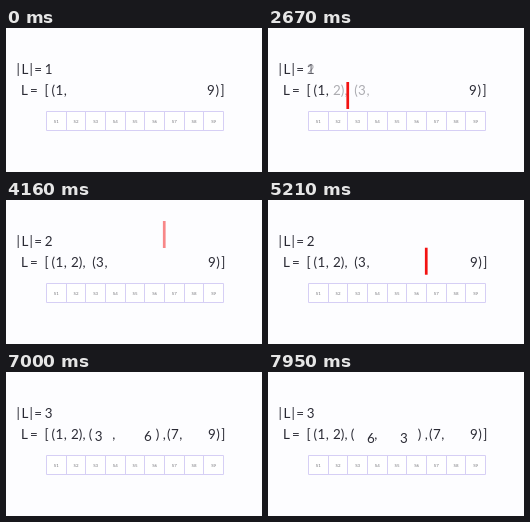
An HTML page for the animation above (7.99 s loop, 256 px wide and 144 px high).

```html
<!DOCTYPE html>
<html lang="en">
<head>
<meta charset="utf-8">
<title>Splitting a list of intervals</title>
<style>
  html, body { margin: 0; width: 100%; height: 100%; overflow: hidden; background: #fdfdff; }
  svg { display: block; width: 100vw; height: 100vh; }
  text { font: 13.4px Lato, "Open Sans", sans-serif; fill: #2a2a34; text-anchor: middle; }
  .label { font-size: 4.4px; fill: #77777c; }
  .cells { fill: #fff; stroke: #d6cff5; stroke-width: 1; }
  .bar { fill: #f31212; }
</style>
</head>
<body>
<svg id="stage" viewBox="0 0 256 144"></svg>
<script>
const LOOP = 7990, ROW1 = 46, ROW2 = 67;
const stage = document.getElementById("stage");

function add(tag, attrs, parent = stage, content = "") {
  const el = document.createElementNS("http://www.w3.org/2000/svg", tag);
  for (const key in attrs) el.setAttribute(key, attrs[key]);
  el.textContent = content;
  parent.appendChild(el);
  return el;
}

// Each glyph is given as [character, centre x].
function glyphs(y, list) {
  const g = add("g", {});
  for (const [ch, x] of list) add("text", { x, y }, g, ch);
  return g;
}

// Row of nine cells
const LEFT = 40.5, TOP = 83.5, CELL = 177 / 9, HEIGHT = 19;
let lines = `M${LEFT} ${TOP}h177v${HEIGHT}h-177z`;
for (let i = 1; i < 9; i++) lines += `M${LEFT + Math.round(i * CELL)} ${TOP}v${HEIGHT}`;
add("path", { d: lines, class: "cells" });
for (let i = 0; i < 9; i++) {
  add("text", { x: LEFT + (i + 0.5) * CELL, y: 94.8, class: "label" }, stage, "S" + (i + 1));
}

// Text
glyphs(ROW1, [["|", 12.3], ["L", 19], ["|", 25.3], ["=", 32.2]]);
const counts = [1, 2, 3].map(n => glyphs(ROW1, [[n, 42.6]]));
glyphs(ROW2, [["L", 18.5], ["=", 28], ["[", 40.5], ["(", 47.2], ["1", 53.3], [",", 59.3]]);
const tail = glyphs(ROW2, [["9", 205], [")", 211.2], ["]", 216.5]]);
const firstSplit = glyphs(ROW2, [["2", 69], [")", 74.5], [",", 78]]);
const openThree = glyphs(ROW2, [["(", 88], ["3", 94], [",", 100]]);
const closeSix = glyphs(ROW2, [["6", 146.2], [")", 152.3], [",", 156.2]]);
const openSeven = glyphs(ROW2, [["(", 162.8], ["7", 168.8], [",", 174.8]]);
const spread = glyphs(ROW2, [["(", 84.5], [",", 107.8], [")", 151.5], [",", 158.2]]);
const three = glyphs(ROW2, [["3", 0]]);
const six = glyphs(ROW2, [["6", 0]]);

// Red dividers: fade in, drop, fade out
const bars = [
  { x: 78.4, from: 17.3, to: 54, fadeIn: 970, drop: 1510, fadeOut: 3000 },
  { x: 156.9, from: 21, to: 57, fadeIn: 3910, drop: 4570, fadeOut: 6060 }
];
for (const b of bars) b.el = add("rect", { x: b.x, y: 0, width: 2.7, height: 27, class: "bar" });

const ramp = (t, start, length) => Math.min(1, Math.max(0, (t - start) / length));
const ease = p => p < 0.5 ? 2 * p * p : 1 - 2 * (1 - p) ** 2;
const mix = (a, b, p) => a + (b - a) * p;
const show = (el, opacity) => el.setAttribute("opacity", opacity);
const move = (el, x, y) => el.setAttribute("transform", `translate(${x} ${y})`);

function draw(t) {
  for (const b of bars) {
    b.el.setAttribute("y", mix(b.from, b.to, ease(ramp(t, b.drop, 1000))));
    show(b.el, ramp(t, b.fadeIn, 500) * (1 - ramp(t, b.fadeOut, 500)));
  }

  const split1 = ramp(t, 2480, 500), split2 = ramp(t, 5560, 500);
  const loose = t >= 6570 ? 1 : 0;
  show(counts[0], 1 - split1);
  show(counts[1], split1 * (1 - split2));
  show(counts[2], split2);
  show(firstSplit, split1);
  show(openThree, split1 * (1 - loose));
  show(closeSix, split2 * (1 - loose));
  show(openSeven, split2);
  move(tail, t < 3930 ? 0 : 0.8, 0);

  // The two digits trade places along a shallow arc.
  const p = ease(ramp(t, 6743, 1578)), dip = 11 * Math.sin(Math.PI * p);
  for (const el of [spread, three, six]) show(el, loose);
  move(three, mix(90, 141.5, p), dip);
  move(six, mix(144.3, 97.8, p), dip);
}

const begin = performance.now();
function tick() {
  draw((performance.now() - begin) % LOOP);
  requestAnimationFrame(tick);
}
tick();
</script>
</body>
</html>
```
